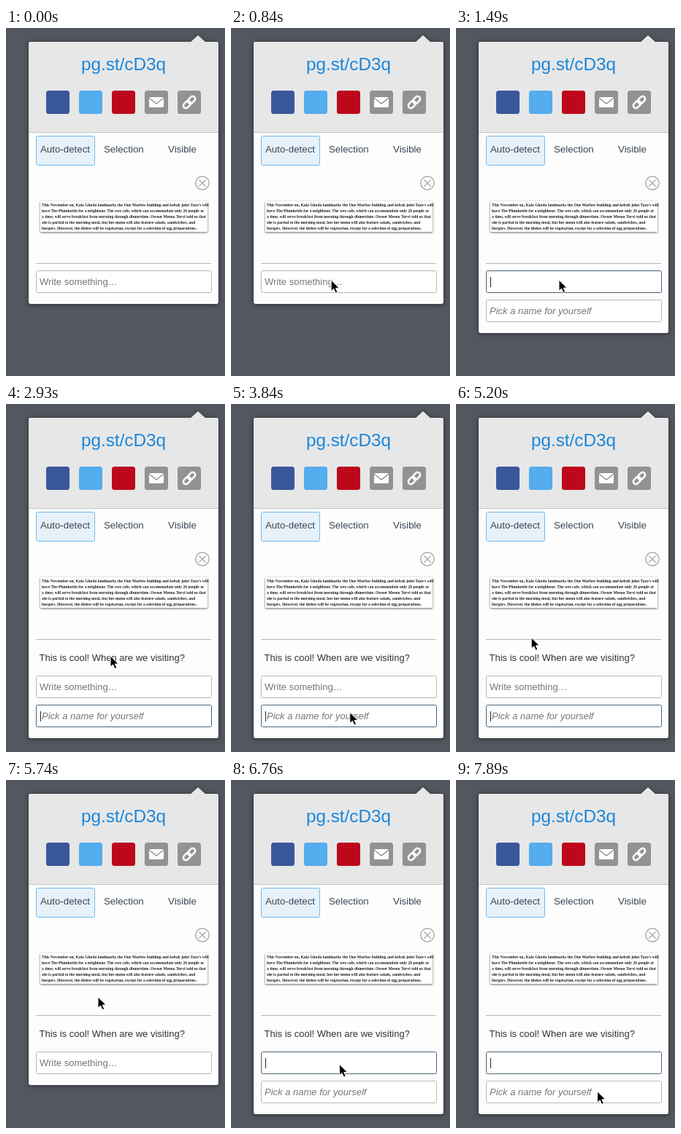
Animation of 300 by 478 pixels, one loop 8 s. Source, as an HTML page:

```html
<!DOCTYPE html>
<html lang="en">
<head>
<meta charset="utf-8">
<title>Share panel</title>
<style>
  html, body { margin: 0; width: 100%; height: 100%; overflow: hidden; background: #53575f; }
  svg { display: block; width: 100%; height: 100%; font: 13px "Liberation Sans", Arial, sans-serif; }
  .panel { filter: drop-shadow(0 1px 3px rgba(0, 0, 0, .5)); }
  .tab { font-size: 13.3px; fill: #3b4555; }
  .clip { font: bold 5.55px "Liberation Serif", serif; fill: #222; }
  .clip-paper { fill: #fff; filter: drop-shadow(0 1px 1.5px rgba(0, 0, 0, .6)); }
  .field rect { fill: #fff; stroke: #b9b9b9; }
  .field text { fill: #777; }
  .field line { stroke: #222; visibility: hidden; }
  .field.focus rect { stroke: #4d6375; }
  .field.focus line { visibility: visible; }
  .field .typed, .comment { fill: #333; }
  .name text { font-style: italic; }
</style>
</head>
<body>
<svg viewBox="0 0 300 478">
  <defs>
    <clipPath id="inside"><rect id="insideRect" x="31" y="19" width="260" height="360"/></clipPath>
  </defs>

  <g class="panel">
    <path d="M252 20L263 10L274 20Z" fill="#e7e7e7"/>
    <rect id="body" x="31" y="19" width="260" height="360" rx="3" fill="#fdfdfd"/>
    <path d="M31 143V22Q31 19 34 19H288Q291 19 291 22V143Z" fill="#e7e7e7"/>
  </g>
  <path d="M31 143.5H291" stroke="#c4c4c4"/>
  <text x="161" y="58" text-anchor="middle" font-size="24.3" fill="#1c87db">pg.st/cD3q</text>

  <g id="buttons"></g>
  <g fill="none" stroke="#fff">
    <rect x="196" y="95" width="20" height="14" rx="1" fill="#fff" stroke="none"/>
    <path d="M196 96L206 104L216 96" stroke="#929292" stroke-width="1.5"/>
    <g transform="rotate(-45 251 102)" stroke-width="2.6">
      <rect x="241" y="98.5" width="11" height="7" rx="3.5"/>
      <rect x="250" y="98.5" width="11" height="7" rx="3.5"/>
    </g>
  </g>

  <rect x="41.5" y="148.5" width="80" height="40" rx="2" fill="#e6f1fa" stroke="#74b9ea"/>
  <g class="tab">
    <text x="47" y="171">Auto-detect</text>
    <text x="134" y="171">Selection</text>
    <text x="222" y="171">Visible</text>
  </g>

  <g fill="none" stroke="#a9a9a9" stroke-width="1.4">
    <circle cx="269" cy="213" r="9.2"/>
    <path d="M264.5 208.5l9 9m0 -9l-9 9"/>
  </g>

  <rect class="clip-paper" x="47" y="238" width="229" height="42"/>
  <g class="clip">
    <text x="49" y="245">This November on, Kala Ghoda landmarks the One Marlow building and kebab joint Tazo's will</text>
    <text x="49" y="253">have The Plumkettle for a neighbour. The wee cafe, which can accommodate only 26 people at</text>
    <text x="49" y="261">a time, will serve breakfast from morning through dinnertime. Owner Meena Torvi told us that</text>
    <text x="49" y="269">she is partial to the morning meal, but her menu will also feature salads, sandwiches, and</text>
    <text x="49" y="277">burgers. However, the dishes will be vegetarian, except for a selection of egg preparations.</text>
  </g>
  <path d="M41 323.5H281" stroke="#b5b5b5"/>

  <text id="comment" class="comment" x="45.5" y="353">This is cool! When are we visiting?</text>
  <g clip-path="url(#inside)">
    <g id="message" class="field">
      <rect x="41.5" y=".5" width="240" height="30" rx="2"/>
      <text x="46" y="20"></text>
      <line y1="9" y2="23"/>
    </g>
    <g id="name" class="field name">
      <rect x="41.5" y=".5" width="240" height="30" rx="2"/>
      <text x="46" y="20">Pick a name for yourself</text>
      <line x1="47.5" x2="47.5" y1="9" y2="23"/>
    </g>
  </g>

  <path id="cursor" d="M0 0V15.2L3.5 12L6 17.6L8.7 16.4L6.3 11H11Z" fill="#000" stroke="#fff" stroke-linejoin="round"/>
</svg>

<script>
const LOOP = 8000, STEP = 59.5, FIELD_GAP = 40;
const COMMENT = "This is cool! When are we visiting?";
const el = id => document.getElementById(id);

const linear = p => p;
const easeOut = p => p * (2 - p);
const smooth = p => p * p * (3 - 2 * p);

// Each move starts where the one before it ended.
const moves = [
  { at: 360, steps: 10, ease: easeOut, path: [[-25, 206], [138, 347]] },
  { at: 1190, steps: 1, path: [[141, 346]] },
  { at: 2450, steps: 1, path: [[143, 346]] },
  { at: 3110, steps: 14, ease: smooth, path: [[163, 424]] },
  { at: 3960, steps: 14, path: [[145, 446], [95, 447], [50, 428], [70, 402], [146, 401], [169, 437], [100, 448]] },
  { at: 4790, steps: 12, ease: easeOut, path: [[65, 436], [62, 395], [92, 335], [126, 298]] },
  { at: 5920, steps: 10, ease: smooth, path: [[148.5, 390.5]] },
  { at: 7000, steps: 1, path: [[149.5, 391]] },
  { at: 7240, steps: 1, path: [[149.5, 392]] },
  { at: 7420, steps: 9, ease: smooth, path: [[194.5, 428.5]] }
];
moves.forEach((move, i) => {
  if (i) move.path.unshift(moves[i - 1].path.at(-1));
});

// Catmull-Rom curve through the points, p from 0 to 1.
function along(points, p) {
  const last = points.length - 1;
  const i = Math.min(last - 1, Math.floor(p * last));
  const u = p * last - i;
  const pick = k => points[Math.max(0, Math.min(last, k))];
  const [a, b, c, d] = [i - 1, i, i + 1, i + 2].map(pick);
  return [0, 1].map(k => b[k] + u / 2 * (c[k] - a[k]
    + u * (2 * a[k] - 5 * b[k] + 4 * c[k] - d[k]
    + u * (3 * (b[k] - c[k]) + d[k] - a[k]))));
}

function drawCursor(t) {
  const move = moves.findLast(m => t >= m.at);
  el("cursor").style.visibility = move ? "visible" : "hidden";
  if (!move) return;
  const step = Math.floor((t - move.at) / STEP) + 1;
  const p = (move.ease || linear)(Math.min(1, step / move.steps));
  el("cursor").setAttribute("transform", `translate(${along(move.path, p)})`);
}

// How much of the name field is unfolded, 0 to 1.
function unfolded(t) {
  if (t < 1190) return 0;
  if (t < 1490) return (Math.floor((t - 1190) / 100) + 1) / 4;
  return t < 5740 || t >= 6760 ? 1 : 0;
}

function drawForm(t) {
  const posted = t >= 2930;
  const writing = (t >= 1190 && !posted) || t >= 6760;
  const typed = t >= 2090 && !posted;
  const top = 333 + (posted ? FIELD_GAP : 0);
  const open = unfolded(t);
  const height = top + 46 + open * FIELD_GAP - 19;
  el("body").setAttribute("height", height);
  el("insideRect").setAttribute("height", height);
  el("comment").style.visibility = posted ? "visible" : "hidden";

  const message = el("message"), name = el("name");
  message.setAttribute("transform", `translate(0 ${top})`);
  message.classList.toggle("focus", writing);
  const [text, caret] = [message.querySelector("text"), message.querySelector("line")];
  text.textContent = typed ? COMMENT : writing ? "" : "Write something…";
  text.classList.toggle("typed", typed);
  for (const end of ["x1", "x2"]) caret.setAttribute(end, typed ? 246.5 : 47.5);

  const naming = posted && t < 5740;
  name.setAttribute("transform", `translate(0 ${top + FIELD_GAP})`);
  name.style.visibility = open ? "visible" : "hidden";
  name.classList.toggle("focus", naming);
  name.querySelector("text").setAttribute("x", naming ? 49 : 46);
}

el("buttons").innerHTML = ["#3a579b", "#55acee", "#bd081c", "#929292", "#929292"]
  .map((fill, i) => `<rect x="${55 + 45 * i}" y="86" width="32" height="32" rx="3.5" fill="${fill}"/>`)
  .join("");

const start = performance.now();
function frame() {
  const t = (performance.now() - start) % LOOP;
  drawForm(t);
  drawCursor(t);
  requestAnimationFrame(frame);
}
frame();
</script>
</body>
</html>
```
